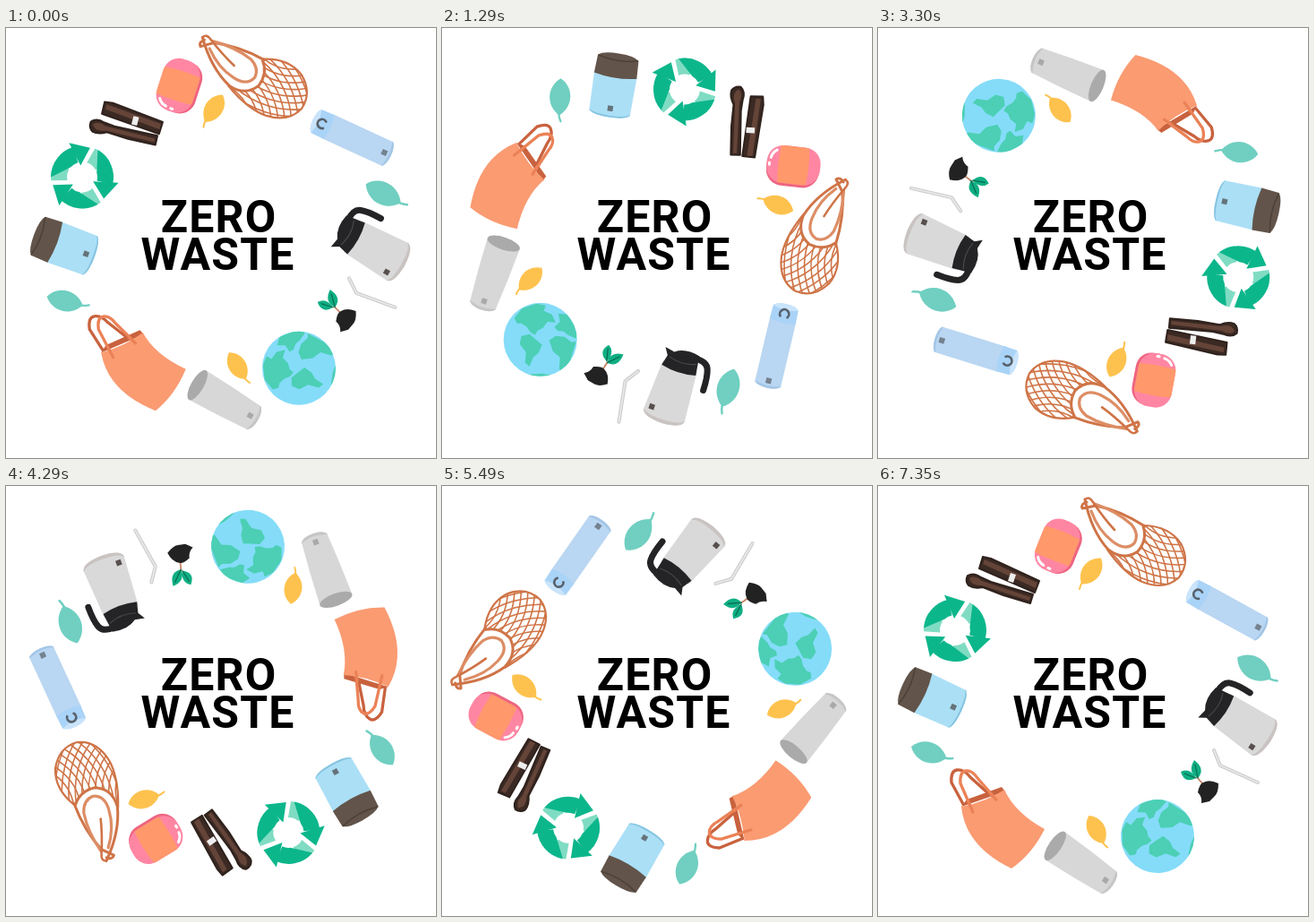
Write an HTML page that moves like this. It is 480 px wide and 480 px high and loops after 8.02 s.

```html
<!DOCTYPE html>
<html lang="en">
<head>
<meta charset="utf-8">
<title>Zero waste</title>
<style>
html, body { margin: 0; width: 100%; height: 100%; overflow: hidden; background: #fff; }
svg { display: block; width: 100vw; height: 100vh; }
text { font: 700 50px Roboto, Inter, sans-serif; letter-spacing: 1.2px; text-anchor: middle; }
.line { fill: none; stroke-linecap: round; stroke-linejoin: round; }
</style>
</head>
<body>
<svg viewBox="0 0 480 480">
  <defs>
    <clipPath id="netClip"><path d="M297 44Q325 45 338 64Q349 85 336 102Q320 117 295 107Q275 98 256 71Q275 84 290 73Q301 60 297 44Z"/></clipPath>
    <clipPath id="soapClip"><rect x="-22" y="-30" width="42" height="60" rx="18"/></clipPath>
    <clipPath id="globeClip"><circle r="41"/></clipPath>
  </defs>
  <g id="ring">
    <!-- net bag -->
    <g class="line" stroke="#cf7447">
      <g id="mesh" clip-path="url(#netClip)" stroke-width="1.6"></g>
      <path stroke-width="2.2" d="M297 44Q325 45 338 64Q349 85 336 102Q320 117 295 107Q275 98 256 71"/>
      <path stroke-width="3" d="M298 45Q270 27 243 22L228 25Q226 20 233 18M231 15Q238 50 257 71Q274 84 290 73Q301 60 296 45"/>
      <path stroke="#dd8d65" stroke-width="3.2" d="M238 28Q246 50 262 62Q276 73 286 64Q292 54 283 43Q266 28 242 20"/>
      <path stroke-width="2.6" d="M231 15Q236 11 240 18Q252 36 264 49"/>
    </g>

    <!-- soap -->
    <g transform="translate(201 67) rotate(22)">
      <rect x="-20" y="-29" width="43" height="59" rx="18" fill="#ee6480"/>
      <g clip-path="url(#soapClip)">
        <path fill="#ff86a3" d="M-30-32H30V32H-30Z"/>
        <path fill="#ff986b" d="M-30-14Q0-20 30-14V15Q0 19-30 15Z"/>
        <path class="line" stroke="#fff" stroke-width="3" d="M-16 20Q-13 25-7 26M-1 27H1"/>
      </g>
    </g>

    <!-- tongs -->
    <g stroke="#2f211c" stroke-width="2" stroke-linejoin="round">
      <path fill="#3b2a24" d="M117 79L126 81L180 106L175 119L113 92Z"/>
      <path fill="#654438" stroke="none" d="M119 82L178 108L176 114L117 87Z"/>
      <path fill="#eee" stroke="none" d="M148 97L154 99L151 108L145 106Z"/>
      <path fill="#3b2a24" d="M100 100Q107 96 115 102L126 107L173 121L170 131L140 122L117 113Q107 115 101 111Q97 106 100 100Z"/>
      <path fill="#654438" stroke="none" d="M102 103Q108 99 116 106L170 124L169 128L116 111Q104 112 102 103Z"/>
    </g>

    <!-- recycling arrows -->
    <g id="arrows" transform="translate(86 161)"></g>

    <!-- food jar -->
    <g transform="translate(60.5 236) rotate(-65.5)">
      <path fill="#abdff6" d="M-24-12H24L23 31Q18 36 0 36Q-18 36-23 31Z"/>
      <path fill="#85c4e0" d="M-23 30Q-18 34 0 34Q18 34 23 30V31Q18 36 0 36Q-18 36-23 31Z"/>
      <path fill="#62544a" d="M-24-11L-23-31Q-18-36 0-36Q18-36 23-31L24-11Q0-6-24-11Z"/>
      <path class="line" stroke="#4c4038" stroke-width="1.5" d="M-22-31Q0-25 22-31"/>
      <rect x="-3" y="23" width="6" height="6" fill="#66737a"/>
    </g>

    <!-- tote -->
    <path fill="#c9623e" d="M93 358L99 350L138 336L142 341Z"/>
    <g class="line" stroke-width="3.3">
      <path stroke="#c9623e" d="M95 355L82 331Q81 318 88 317Q96 316 103 325L124 344"/>
      <path stroke="#eb8257" d="M106 364L92 332Q91 319 98 318Q105 317 111 326L132 350"/>
    </g>
    <path fill="#fa9b72" d="M93 358Q122 352 141 339Q153 365 186 383Q172 411 149 427Q118 412 104 390Q95 376 93 358Z"/>
    <path class="line" stroke="#eb8257" stroke-width="3.3" d="M102 355L106 364M125 343L132 350"/>

    <!-- tumbler -->
    <g transform="translate(227.5 422) rotate(-55.8)">
      <path fill="#d7d7d7" d="M-19-36Q-18 0-15 37Q-11 42 0 42Q11 42 15 37Q18 0 19-36Z"/>
      <path fill="#c6c6c6" d="M-15 36Q0 42 15 36V37Q11 42 0 42Q-11 42-15 37Z"/>
      <ellipse cy="-36" rx="19" ry="7" fill="#aaa"/>
      <rect x="-3" y="29" width="6" height="6" fill="#a9a9a9"/>
    </g>

    <!-- globe -->
    <g transform="translate(312 391) rotate(-74.5)">
      <circle r="41" fill="#84dcf9"/>
      <g fill="#4ccfb4" clip-path="url(#globeClip)">
        <path d="M-29-24L-20-35L-4-40L6-38L4-32L13-28L17-19L8-20L3-13L-3-10L-6-5L-11-8L-15-14L-21-18L-26-18Z"/>
        <path d="M-21-4L-12-6L-5 0L2 6L-2 15L-8 20L-12 30L-17 26L-16 14L-23 5Z"/>
        <path d="M10 1L17-4L27-3L35 3L40 2L37 12L34 22L27 37L21 33L22 20L14 13Z"/>
        <path d="M19-10L16-14L22-20L20-29L30-28L42-10L40-1L31-5L26-9Z"/>
        <path d="M-14 39L2 38L14 40L8 44H-8Z"/>
      </g>
    </g>

    <!-- sprout -->
    <path class="line" stroke="#c98566" stroke-width="1.8" d="M366 336Q358 328 353 321"/>
    <path fill="#222" d="M357 342Q359 332 363 331Q370 327 380 332Q380 342 376 346L370 352L361 354Q362 347 357 342Z"/>
    <path fill="#0fae83" d="M338 319Q348 314 355 326Q342 333 338 319ZM353 306Q366 316 357 326Q345 319 353 306Z"/>
    <path class="line" stroke="#086a50" stroke-width="1.2" d="M342 321L355 326M354 311L357 326"/>

    <!-- straw -->
    <g class="line">
      <path stroke="#ccc" stroke-width="4" d="M375 295L382 312L424 331"/>
      <path stroke="#e8e8e8" stroke-width="1.8" d="M375 295L382 312L424 331"/>
    </g>

    <!-- carafe -->
    <g transform="translate(407 265) rotate(-56.5)">
      <path fill="#d9d9d9" d="M-20-30H20L24 27Q24 36 0 37Q-24 36-24 27Z"/>
      <path fill="#c9c3c1" d="M-24 27Q-20 33 0 33Q20 33 24 27Q24 36 0 37Q-24 36-24 27Z"/>
      <path class="line" stroke="#242426" stroke-width="7" d="M13-43Q27-44 30-36Q33-28 33-12"/>
      <path fill="#242426" d="M-20-25L-17-37L-22-45L-11-43Q0-51 17-47L20-25Q0-20-20-25Z"/>
      <path class="line" stroke="#48484b" stroke-width="1.2" d="M-14-36Q2-31 16-37"/>
      <rect x="-19" y="20" width="6" height="6" fill="#58504e"/>
    </g>

    <!-- bottle -->
    <g transform="translate(389.5 138.5) rotate(-61.2) scale(1.02)">
      <path fill="#b9d6f2" d="M-14.5-30H14.5V43Q10 47 0 47Q-10 47-14.5 43Z"/>
      <path fill="#a4c6e6" d="M-14.5 42Q0 47 14.5 42V43Q10 47 0 47Q-10 47-14.5 43Z"/>
      <path fill="#a9d3f7" d="M-14.5-28L-14-43Q-10-47 0-47Q10-47 14-43L14.5-28Q0-24-14.5-28Z"/>
      <path fill="#c9e4fb" d="M-14-43Q-10-47 0-47Q10-47 14-43Q0-38-14-43Z"/>
      <path class="line" stroke="#58616b" stroke-width="2.6" d="M-4-33A5 5 0 1 1 4-33"/>
      <rect x="-3" y="36" width="6" height="6" fill="#75828f"/>
    </g>
  </g>
  <text x="237.6" y="228">ZERO</text>
  <text x="236.6" y="270">WASTE</text>
</svg>
<script>
const find = id => document.getElementById(id);
const ring = find("ring");
const add = (parent, markup) => parent.insertAdjacentHTML("beforeend", markup);

function leaf(x, y, angle, scale, color) {
  add(ring, `<g transform="translate(${x} ${y}) rotate(${angle}) scale(${scale})">
    <path fill="${color}" d="M-22 0C-13-16 10-17 21-1C11 15-11 16-22 0Z"/>
    <path class="line" stroke="${color}" stroke-width="2.4" d="M10 0Q20 1 28-3"/></g>`);
}
leaf(420, 204, 34, 1.03, "#70cfc1");
leaf(57, 298, 19, 0.96, "#70cfc1");
leaf(237.5, 95, 128, 0.84, "#fdc24e");
leaf(243.5, 384, 63, 0.82, "#fdc24e");

// Two crossing families of arcs form the net.
for (let r = 24; r < 130; r += 7.5) {
  add(find("mesh"), `<circle cx="334" cy="4" r="${r}"/><circle cx="232" cy="112" r="${r}"/>`);
}

function polar(r, deg) {
  const a = deg * Math.PI / 180;
  return `${(r * Math.cos(a)).toFixed(1)} ${(r * Math.sin(a)).toFixed(1)}`;
}
// A ring segment whose start edge may slant.
const band = (outer, inner, to, color) =>
  `<path fill="${color}" d="M${polar(35, outer)}A35 35 0 0 1 ${polar(35, to)}L${polar(17, to)}A17 17 0 0 0 ${polar(17, inner)}Z"/>`;
for (const turn of [0, 120, 240]) {
  add(find("arrows"), `<g transform="rotate(${turn})">${band(178, 172, 215, "#7fdcc3")}${band(184, 226, 258, "#0cb68b")}
    <path fill="#0cb68b" d="M${polar(41, 253)}L${polar(34, 289)}L${polar(13, 266)}Z"/></g>`);
}

// time, turn in degrees, pivot x, pivot y
const poses = [
  [0, -364.1, 242, 230.8],
  [1290, -285.5, 238.9, 235.1],
  [2340, -234.1, 238.4, 234.6],
  [3300, -191.5, 238.3, 234.5],
  [4290, -143.6, 237.9, 236.1],
  [5490, -83.8, 232.4, 238.8],
  [7350, 0, 237.9, 236.4]
];
const LOOP = 8020, STEP = 30, END = 7350;

function slope(i, k) {
  const a = poses[Math.max(i - 1, 0)], b = poses[Math.min(i + 1, poses.length - 1)];
  return (b[k] - a[k]) / (b[0] - a[0]);
}

function valueAt(t, k) {
  let i = 0;
  while (i < poses.length - 2 && t > poses[i + 1][0]) i++;
  const a = poses[i], b = poses[i + 1], span = b[0] - a[0], u = (t - a[0]) / span, v = 1 - u;
  return v * v * (1 + 2 * u) * a[k] + u * u * (3 - 2 * u) * b[k]
    + span * u * v * (v * slope(i, k) - u * slope(i + 1, k));
}

const start = performance.now();
function draw() {
  const elapsed = (performance.now() - start) % LOOP;
  const t = Math.min(END, Math.floor(elapsed / STEP) * STEP);
  const [turn, x, y] = [1, 2, 3].map(k => valueAt(t, k));
  ring.setAttribute("transform", `translate(${x} ${y}) rotate(${turn}) translate(-237.9 -236.4)`);
  requestAnimationFrame(draw);
}
draw();
</script>
</body>
</html>
```
